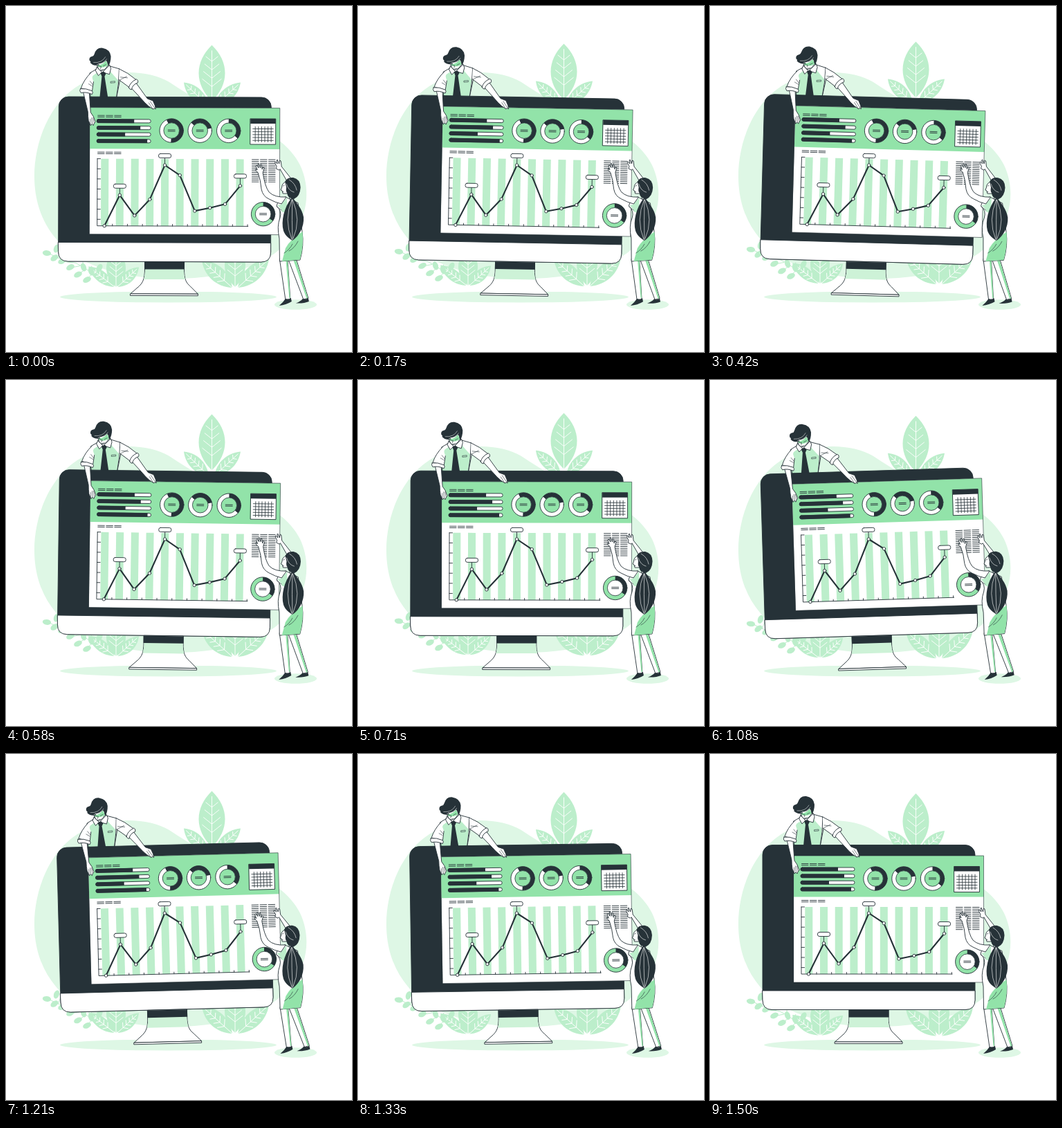
An HTML page that plays this animation: 500 px wide and 500 px high, repeating every 1540 ms.

```html
<!DOCTYPE html>
<html lang="en">
<head>
<meta charset="utf-8">
<title>Dashboard</title>
<style>
html, body { margin: 0; width: 100%; height: 100%; overflow: hidden; background: #fff; }
svg { display: block; width: 100vw; height: 100vh; }
.ink { fill: none; stroke: #263238; stroke-width: .9; stroke-linecap: round; stroke-linejoin: round; }
.skin { fill: #fff; stroke: #263238; stroke-width: .9; stroke-linecap: round; stroke-linejoin: round; }
.thin { fill: none; stroke: #263238; stroke-width: .6; stroke-linecap: round; }
.vein { fill: none; stroke: #fff; stroke-width: .9; stroke-linecap: round; }
.dark { fill: #263238; }
.green { fill: #92e3a9; }
.soft { fill: #bceecb; }
.pale { fill: #def7e5; }
</style>
</head>
<body>
<svg viewBox="0 0 500 500">
  <path class="pale" d="M41 246C41 198 62 139 108 113C150 90 205 92 236 110C270 132 300 152 340 167C380 179 412 203 425 230C440 262 437 300 415 330C388 370 330 394 240 394C160 394 100 372 72 336C50 310 41 278 41 246Z"/>
  <ellipse class="pale" cx="234.500" cy="420.500" rx="156.500" ry="8"/>
  <ellipse class="pale" cx="418.500" cy="431.500" rx="30.500" ry="7.300"/>
  <g id="plants"></g>

  <g id="desk">
    <g id="torso">
      <path class="skin" d="M121 97L133 90L149 87L163 91L165 103L159 134H122L120 112Z"/>
      <path class="soft" d="M125 101L132 96L139 98L149 93L153 98L162 108L158.500 134H122L120.500 114Z"/>
      <path class="ink" d="M163 91Q163 112 159 134M120 112L122 134"/>
      <path class="skin" d="M132 82L131 91L139 97L149 90L147 78Z"/>
      <path class="skin" d="M131 89L138 96L133 101L129 94ZM149 86L139 96L149 99L151 91Z"/>
      <path class="dark" d="M136 97L141 95L144 98L142 102L147 133H135L138 102Z"/>
      <path class="thin" d="M151 109.500L157 109V111L151 111.500Z"/>
      <path class="skin" d="M130 81Q132 93 137 94Q143 93 146 87L147 77Z"/>
      <path class="green" d="M131.500 85.500Q139 86 144 79L147 86L143 88Q137 90 132.500 88Z"/>
      <path class="thin" d="M133 87L137 88M140 87L144 85M137 88L136 91M136 93L140 92"/>
      <path class="dark" d="M120 79Q119 74 124 73Q126 73 127 70Q130 60 139 61Q150 63 151 73Q151 82 147 88Q147 82 144 79Q138 85 132 83Q136 85 133 86Q125 87 121 82Q123 82 120 79Z"/>
      <path class="vein" style="stroke-width:.5" d="M126 82Q138 83 143 74M131 85Q141 83 145 77"/>
    </g>
    <rect class="dark" x="76" y="131.500" width="307" height="238" rx="14" stroke="#263238" stroke-width=".9"/>
    <path class="skin" d="M76 342H383V355.500Q383 369.500 369 369.500H90Q76 369.500 76 355.500Z"/>
    <path class="skin" d="M201 370V380C201 395 198 400 193 405L180.500 416H278L267 405C261 400 258 395 258 380V370Z"/>
    <path fill="#cdf2d7" d="M201.500 380H257.500Q257.500 389 259.500 395H199.500Q201.500 389 201.500 380Z"/>
    <rect class="dark" x="200.500" y="370" width="58" height="10.500"/>
    <path class="skin" d="M180.500 416H278V418.600H180.500Z"/>
    <rect x="121" y="147" width="274.500" height="183" fill="#fff"/>
    <rect class="green" x="121" y="147" width="274.500" height="59.500"/>
    <rect class="thin" x="121" y="147" width="274.500" height="183"/>
    <g id="panel"></g>
    <g id="arms">
      <path class="skin" d="M111 124L118 153Q118 160 119 166L122 173L124 171L126 173L127 170L129 168L126 160L122 154L120 126Z"/>
      <path class="thin" d="M122 173L121.500 164M124.500 171L123.500 162M127 169L125.500 162"/>
      <path class="skin" d="M122 97Q112 107 108 119L124 124L126 110"/>
      <path class="skin" d="M107 120Q115 119 124 123Q126 125 124 128Q115 124 108 126Q105 123 107 120Z"/>
      <path class="thin" d="M119 113L124 116M121 109L125 114"/>
      <path class="skin" d="M179 117L196 135Q200 140 206 145L212 149L214 148L216 149L215 144L212 137L204 134L188 112Z"/>
      <path class="thin" d="M212 149L206 140M214.500 147.500L208 138"/>
      <path class="skin" d="M163 91Q175 96 188 107L178 118L163 107"/>
      <path class="skin" d="M177 118Q179 110 188 106Q191 107 190 111Q182 114 181 121Q178 121 177 118Z"/>
      <path class="thin" d="M164 107L174 102M165 103L175 104"/>
    </g>
  </g>

  <g id="woman">
    <path class="skin" d="M396 236L407 255L414 252L398 232L397 224L395.500 223L394.500 228L392 222L391 223L392 228L389 225L388.500 227L391 232L390 235L394 237Z"/>
    <path class="skin" d="M395.500 366L404 424H411L407 366Z"/>
    <path class="skin" d="M408 366L430 424L437 422L419 364Z"/>
    <path class="green" d="M404.500 368L409.500 422H411L407 367ZM415 366L434.500 422.500L436.500 422L419 366Z"/>
    <path class="dark" d="M395 433Q401 428 404 423Q408 425 412 422L413 427Q405 432 395 433ZM419 429.500Q426 427 429 423Q433 425 437 422L438 427Q431 430 419 429.500Z"/>
    <path class="skin" d="M403 276Q392 281 391 289Q399 296 396 306Q391 318 395 336L395.500 369L425 367Q431 346 428 326L422 285Z"/>
    <path class="soft" d="M392 288Q397 292 398 297L406 300V277L397 287Z"/>
    <path class="green" d="M399 369L425 366.500Q430.500 346 428.500 326Q411 337 404 350Z"/>
    <path class="thin" d="M402 357Q410 352 414 344M409 354Q417 350 422 340M391 290L398 295"/>
    <path class="skin" d="M364 241Q368 252 369 265Q371 275 380 279Q389 284 398 286L405 276Q388 277 380 269Q374 261 371 241L373 234L371 233L370 236L369 229L367.500 229L367.500 234L365 227.500L364 228.500L365 234L362 230L361 231.500L363 237L360.500 235L361 238Z"/>
    <path class="skin" d="M405 253Q398 257 398.500 262L397 266L399 267L400 271L407 271L411 280L418 276Z"/>
    <path class="thin" d="M400 260L402 259.500M399.500 268.500H401"/>
    <path class="dark" d="M403 254Q406 247 415 248Q425 250 425.500 262Q425 275 416 279Q407 278 406 270Q404 268 405 262Z"/>
    <path class="dark" d="M412 278C402 291 397 311 401 325C404 333 410 336 414 339C424 332 431 319 430 305C428 293 420 285 415 278Z"/>
    <path class="vein" style="stroke-width:.6" d="M413 280Q401 309 413 337M413.500 280Q413 310 414 338M414 280Q427 309 415 336M405 257Q408 267 416 269M409 251Q418 256 420 266"/>
  </g>
</svg>
<script>
const LOOP = 1540, LEAD = 38;
const $ = id => document.getElementById(id);
const add = (id, s) => $(id).insertAdjacentHTML('beforeend', s);
const path = (cls, d, extra = '') => `<path class="${cls}" d="${d}" ${extra}/>`;
const seq = (n, f) => Array.from({ length: n }, (_, i) => f(i)).join('');

// A veined leaf growing from (x, y) to its tip (u, v); half is its half width.
function leaf(x, y, u, v, half) {
  const len = Math.hypot(u - x, v - y);
  const turn = Math.atan2(u - x, y - v) * 180 / Math.PI;
  const w = half / .75;
  const veins = seq(4, i => {
    const a = -(.26 + .15 * i) * len, r = half * (.72 - .09 * i);
    return `M${-r} ${a - r * .8}L0 ${a}L${r} ${a - r * .8}`;
  });
  const outline = `M0 0C${-w} ${-.3 * len} ${-w} ${-.7 * len} 0 ${-len}` +
    `C${w} ${-.7 * len} ${w} ${-.3 * len} 0 0Z`;
  return `<g transform="translate(${x} ${y}) rotate(${turn})">` +
    path('soft', outline) + path('vein', `M0 0V${-.9 * len}${veins}`) + '</g>';
}

const sprig = (x, y, turn) =>
  `<ellipse class="soft" rx="6.200" ry="3.900" transform="translate(${x} ${y}) rotate(${turn})"/>`;

add('plants',
  leaf(293, 146, 257, 111, 9) + leaf(301, 146, 339, 111, 9) + leaf(297.5, 138, 297.5, 57, 19) +
  leaf(159, 406.5, 159, 352, 14) + leaf(157, 406.5, 119, 377, 8) + leaf(161, 406.5, 192, 378, 8) +
  leaf(331, 406.5, 331, 345, 15) + leaf(327, 407.5, 283, 368, 11) + leaf(335, 407.5, 380, 366, 11) +
  path('', 'M60 357Q82 369 101 372Q121 381 134 398M75 365L80 353M96 371L82 370M107 376L92 379M115 381L103 389M124 388L116 396M112 378L111 370M121 384L124 376M128 390L135 378',
    'fill="none" stroke="#bceecb"') +
  [[59, 357.5, 8], [73, 351, -70], [70, 364.5, -35], [81, 369, -30], [93, 378, -25], [104, 388.5, -25],
   [117, 396, -25], [112, 378, 70], [123, 384, 70], [135, 379, -60]].map(a => sprig(...a)).join(''));

// Filler text: pairs of short strokes.
const words = (x, y) => path('ink', seq(3, i =>
  `M${x + 12 * i} ${y}h9.500M${x + 12 * i} ${y + 2.2}h9.500`));

const bar = (y, end) =>
  `<rect class="skin" x="131" y="${y - 2.5}" width="78" height="5" rx="2.500"/>` +
  path('dark', `M${end} ${y - 2.8}H133.500a2.800 2.800 0 0 0 0 5.600H${end}Z`);

const donut = (x, y, ring, core, from, sweep) => `<g transform="translate(${x} ${y})">
  <circle r="17.200" fill="${ring}"/>
  <circle r="14.200" fill="none" stroke="#263238" stroke-width="6" pathLength="360"
    stroke-dasharray="${sweep} ${360 - sweep}" transform="rotate(${from - 90})"/>
  <circle class="ink" r="17.200"/><circle r="11.300" fill="${core}" stroke="#263238" stroke-width=".8"/>
  ${path('ink', 'M-5 -1H5M-5 1H5')}</g>`;

const calendar =
  '<rect class="skin" x="353" y="162.500" width="36.500" height="37"/>' +
  '<rect class="dark" x="353" y="162.500" width="36.500" height="7"/>' +
  path('ink', seq(5, i => `M356.500 ${177 + 4.2 * i}H386`) + seq(6, i => `M${360 + 4.6 * i} 174V196`),
    'style="stroke-width:.8"');

const points = [[142.5, 318], [164.5, 273.5], [186, 303], [208, 279.5], [229.5, 230],
  [251.3, 244.5], [273, 296], [295, 291.5], [316.7, 286], [338.5, 259.5]];

const tag = ([x, y], top) => path('ink', `M${x} ${y}V${top}`) +
  `<rect class="skin" x="${x - 9}" y="${top - 3}" width="18" height="6" rx="2.500"/>`;

const chart =
  seq(10, i => `<rect class="soft" x="${137.3 + 21.7 * i}" y="221" width="11" height="97"/>`) +
  path('ink', 'M132 221V318H350' + seq(7, i => `M132 ${221 + 14.6 * i}h4.500`) +
    seq(10, i => `M${154 + 21.7 * i} 318v-2.500`)) +
  tag(points[1], 260.5) + tag(points[4], 216.5) + tag(points[9], 245.5) +
  path('ink', 'M' + points.join('L'), 'style="stroke-width:2.100"') +
  points.map(([x, y]) => `<circle class="skin" cx="${x}" cy="${y}" r="2.200"/>`).join('');

add('panel',
  words(132.5, 158.5) + bar(166.5, 185) + bar(176.3, 194) + bar(185.8, 172) + bar(195.4, 204) +
  donut(239, 180, '#fff', '#92e3a9', -25, 208) +
  donut(280, 180, '#fff', '#92e3a9', -48, 126) +
  donut(321.5, 180, '#fff', '#92e3a9', 0, 130) +
  calendar + words(132.5, 211.5) + chart +
  path('ink', seq(13, i => seq(3, j => `M${355.5 + 12 * j} ${221.5 + 2.68 * i}h9.500`))) +
  donut(371.8, 300.2, '#92e3a9', '#fff', 0, 125));

// Linear swing: 0, 1, 0, -1, 0 over one loop.
const swing = p => p < .25 ? 4 * p : p < .75 ? 2 - 4 * p : 4 * p - 4;

function draw(now) {
  const p = (now + LEAD) % LOOP / LOOP;
  const tilt = 1.95 * swing(p);
  const lift = 9.4 * (1 - Math.abs(2 * p - 1));
  $('desk').setAttribute('transform', `rotate(${tilt} 229.500 237)`);
  $('woman').setAttribute('transform', `rotate(${tilt * .55} 399 328)`);
  $('plants').setAttribute('transform', `translate(0 ${-lift})`);
}

function tick() {
  draw(performance.now());
  requestAnimationFrame(tick);
}
tick();
</script>
</body>
</html>
```
